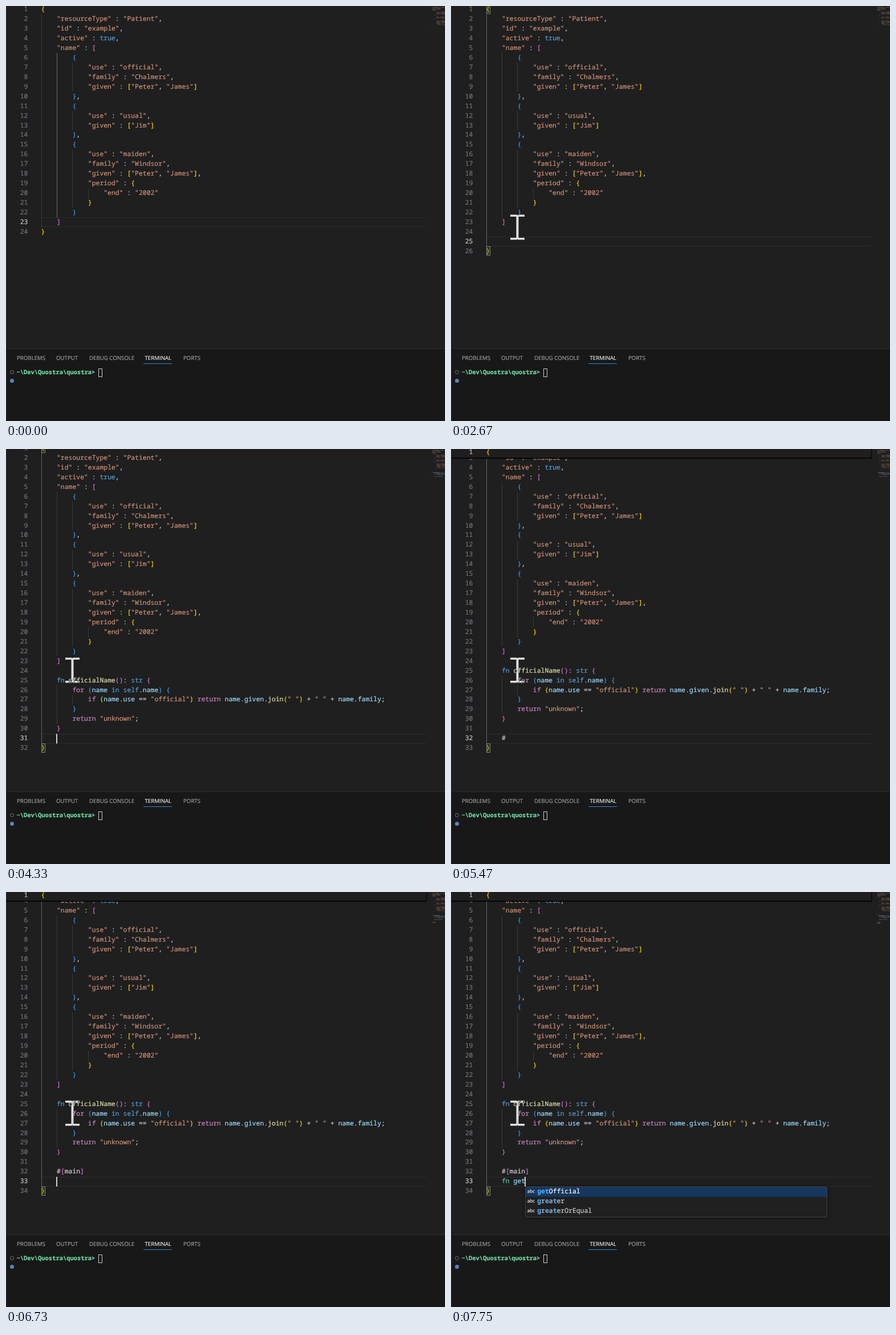
Write an HTML page with a canvas that moves like this. It is 770x727 px and loops after 8000 ms.

```html
<!DOCTYPE html>
<html lang="en">
<head>
<meta charset="utf-8">
<title>Code editor</title>
<style>
  html, body { margin: 0; width: 100%; height: 100%; overflow: hidden; background: #1f1f1f; }
  #stage { position: relative; width: 770px; height: 727px; overflow: hidden; background: #1f1f1f;
    color: #ccc; text-rendering: geometricPrecision; }
  #stage div, #stage canvas, #mouse { position: absolute; box-sizing: border-box; }
  #view, #sticky, #pop { font: 11.43px/16.94px "Noto Sans Mono", monospace; white-space: pre; }
  #view, #sticky, #pop, #panel { -webkit-text-stroke: .2px currentColor; }
  #view { inset: 0 0 127px 0; overflow: hidden; }
  .num, .code { margin-top: .5px; }
  .num { left: 0; width: 38.4px; text-align: right; color: #6e7681; }
  .on { color: #ccc; }
  .cur { left: 62px; width: 675px; height: 16.94px; border: solid #2d2d2d; border-width: 1px 0; }
  .guide { width: 1px; height: 17.2px; background: #3a3a3a; }
  .guide.live { background: #686868; }
  .match { width: 7px; height: 16px; border: 1px solid #888; background: #0064001a; }
  .caret { margin-left: -.9px; width: 1.4px; height: 16.94px; background: #d0d0d0; }
  #map { left: 744px; top: 0; }
  #sticky { left: 1px; top: 0; width: 736px; height: 14.5px; background: #1f1f1f; box-shadow: 0 1px 1px 1px #000c; }
  #sticky div { top: -2.3px; }
  #edge { left: 0; top: 0; width: 1px; height: 727px; background: #2b2b2b; }
  #panel { left: 0; top: 600px; width: 770px; height: 127px; background: #181818; border-top: 1px solid #2b2b2b; }
  .tab { top: 9px; font: 9.7px/14px "Open Sans", sans-serif; color: #9d9d9d; white-space: pre; }
  .tab.open { color: #e7e7e7; }
  #line { left: 241px; top: 25px; width: 50px; height: 1px; background: #2f86d6; }
  #prompt { left: 18.5px; top: 33px; font: bold 10.45px/16px "Noto Sans Mono", monospace; color: #6edba3; white-space: pre; }
  #prompt span { color: #8fd0d4; }
  #box { left: 162px; top: 34px; width: 7px; height: 15px; border: 1px solid #ccc; }
  #ring { left: 7px; top: 37px; width: 7px; height: 7px; border: 1px solid #777; border-radius: 50%; }
  #dot { left: 7px; top: 52px; width: 7px; height: 7px; background: #5b80c2; border-radius: 50%; }
  #pop { top: 515.7px; width: 530px; background: #202020; border: 1px solid #454545; border-radius: 3px;
    box-shadow: 0 0 6px #0008; overflow: hidden; }
  #pop div { left: 0; width: 100%; height: 16.94px; padding-left: 20px; }
  #pop div:first-child { background: #15375e; color: #fff; }
  #pop b { color: #4daafc; }
  #pop i { position: absolute; left: 2.5px; font: 600 8px/16px "Open Sans", sans-serif; letter-spacing: -.2px; color: #ccc; }
  #mouse { left: 0; top: 0; overflow: visible; mix-blend-mode: difference; }
</style>
</head>
<body>
<div id="stage">
  <div id="view"></div>
  <canvas id="map" width="26" height="70"></canvas>
  <div id="sticky"><div class="num on" style="left:-1px">1</div><div style="left:60.6px;color:#ffd700">{</div></div>
  <div id="panel">
    <div class="tab" style="left:19px">PROBLEMS</div>
    <div class="tab" style="left:88px">OUTPUT</div>
    <div class="tab" style="left:146px">DEBUG CONSOLE</div>
    <div class="tab open" style="left:243.5px">TERMINAL</div>
    <div class="tab" style="left:311px">PORTS</div>
    <div id="line"></div><div id="ring"></div><div id="dot"></div>
    <div id="prompt">~\Dev\Quostra\quostra<span>&gt;</span></div>
    <div id="box"></div>
  </div>
  <div id="edge"></div>
  <div id="pop"></div>
  <svg id="mouse" width="1" height="1">
    <path d="M-12.5-22H-1.5L0-21L1.5-22H12.5V-18.500H2V18.500H12.5V22H1.5L0 21L-1.5 22H-12.5V18.500H-2V-18.500H-12.5Z" fill="#fff"/>
  </svg>
</div>
<script>
const $ = id => document.getElementById(id);
const X0 = 61.6, CW = 6.86, LH = 16.94, TOP = -2.27, LOOP = 8000;

const head = `{
    "resourceType" : "Patient",
    "id" : "example",
    "active" : true,
    "name" : [
        {
            "use" : "official",
            "family" : "Chalmers",
            "given" : ["Peter", "James"]
        },
        {
            "use" : "usual",
            "given" : ["Jim"]
        },
        {
            "use" : "maiden",
            "family" : "Windsor",
            "given" : ["Peter", "James"],
            "period" : {
                "end" : "2002"
            }
        }`.split('\n');

const body = `    ]

    fn officialName(): str {
        for (name in self.name) {
            if (name.use == "official") return name.given.join(" ") + " " + name.family;
        }
        return "unknown";
    }

    #[main]`.split('\n');

// time, finished body lines, text on the current line, caret column (-1 = off), matched pair, suggestions
const steps = [
  [0, 0, ']', -1, ''],
  [1200, 0, ']', 5, 'list'],
  [1670, 0, ']', -1, 'list'],
  [2070, 1, '', 4, 'root'],
  [2200, 2, '', 4, 'root'],
  [2670, 2, '', -1, 'root'],
  [3200, 2, '', 4, 'root'],
  [3400, 7, '}', 5, 'fn'],
  [3870, 7, '}', -1, 'fn'],
  [4330, 8, '', 4, 'root'],
  [4400, 8, '', 4, 'root'],
  [4750, 9, '', 4, 'root'],
  [5010, 9, '#', 5, 'root'],
  [5470, 9, '#', -1, 'root'],
  [5610, 9, '#[]', 6, 'attr'],
  [5870, 9, '#[m]', 7, 'attr'],
  [6070, 9, '#[ma]', 8, 'attr'],
  [6140, 9, '#[ma]', 8, 'attr', 'main maiden match'],
  [6270, 9, '#[mai]', 9, 'attr', 'main maiden'],
  [6340, 9, '#[main]', 10, 'attr', 'main maiden'],
  [6540, 9, '#[main]', 11, 'attr'],
  [6730, 10, '', 4, 'root'],
  [6930, 10, 'f', 5, 'root'],
  [7000, 10, 'fn', 6, 'root', 'fn function family for from false official officialName self'],
  [7070, 10, 'fn ', 7, 'root'],
  [7530, 10, 'fn g', 8, 'root'],
  [7600, 10, 'fn g', 8, 'root', 'getOfficial given greater greaterOrEqual group global'],
  [7680, 10, 'fn ge', 9, 'root', 'getOfficial given greater greaterOrEqual'],
  [7750, 10, 'fn get', 10, 'root', 'getOfficial greater greaterOrEqual']
];

const pairColors = ['#ffd700', '#da70d6', '#3a9bf0'];

function wordColor(word, line, end) {
  if (/^(for|if|return)$/.test(word)) return '#c586c0';
  if (word === 'fn' && /fn\s*\w*$/.test(line)) return '#4ec9b0';
  if (/^(fn|in|self|str|true)$/.test(word)) return '#569cd6';
  if (line.includes('#')) return '#d4d4d4';
  return line[end] === '(' ? '#dcdcaa' : '#9cdcfe';
}

// Splits the document into coloured tokens, following bracket depth.
function tokenize(lines) {
  let depth = 0;
  return lines.map(line => [...line.matchAll(/"[^"]*"|\w+|\s+|./g)].map(m => {
    const text = m[0];
    let color = '#ccc';
    if (text[0] === '"') color = '#ce9178';
    else if (/\w/.test(text)) color = wordColor(text, line, m.index + text.length);
    else if (/[{[(]/.test(text)) color = pairColors[depth++ % 3];
    else if (/[}\])]/.test(text)) color = pairColors[--depth % 3];
    return { text, color, col: m.index };
  }));
}

function drawMap(rows) {
  const g = $('map').getContext('2d');
  g.clearRect(0, 0, 26, 70);
  rows.forEach((row, y) => row.forEach(tok => {
    g.fillStyle = tok.color;
    [...tok.text].forEach((ch, i) => {
      if (ch === ' ') return;
      g.globalAlpha = /\w/.test(ch) ? .48 : .28;
      g.fillRect((tok.col + i) * .89, y * 1.7, .8, 1.05);
    });
  }));
}

// Marks the letters of a suggestion that match the typed word in order.
function mark(item, word) {
  let i = 0;
  return [...item].map(ch => ch === word[i] ? (i++, `<b>${ch}</b>`) : ch).join('');
}

function render([time, done, typed, caret, pair, list]) {
  const lines = [...head, ...body.slice(0, done), '    ' + typed, '}'];
  const cur = 23 + done, last = lines.length;
  const scroll = Math.max(0, 378.9 + done * LH - 507.2);
  const top = n => TOP + (n - 1) * LH - scroll;
  const put = (cls, x, n, inner = '') =>
    `<div class="${cls}" style="${x === null ? '' : `left:${X0 + x * CW}px;`}top:${top(n)}px">${inner}</div>`;
  const rows = tokenize(lines);
  let html = put('cur', null, cur);

  lines.forEach((line, i) => {
    const n = i + 1, indent = line ? line.search(/\S|$/) : 4;
    for (let c = 0; c < indent; c += 4) {
      const live = done ? c === 0 : c === 4;
      html += put('guide' + (live ? ' live' : ''), c, n);
    }
    html += put('num' + (n === cur ? ' on' : ''), null, n, n);
    html += put('code', 0, n, rows[i].map(t => `<span style="color:${t.color}">${t.text}</span>`).join(''));
  });

  const pairs = {
    list: [[5, 13], [23, 4]],
    root: [[1, 0], [last, 0]],
    fn: [[25, 27], [30, 4]],
    attr: [[32, 5], [32, 3 + typed.length]]
  };
  (pairs[pair] || []).forEach(([n, c]) => html += put('match', c, n));
  if (caret >= 0) html += put('caret', caret, cur);
  $('view').innerHTML = html;
  $('sticky').style.display = time < 4400 ? 'none' : '';
  drawMap(rows);

  const pop = $('pop');
  pop.style.display = list ? '' : 'none';
  if (list) {
    const items = list.split(' '), word = typed.match(/(\w+)\]?$/)[1];
    pop.style.left = X0 + caret * CW + 'px';
    pop.style.height = items.length * LH + 3 + 'px';
    pop.innerHTML = items.map((it, i) =>
      `<div style="top:${i * LH + .5}px"><i>abc</i>${mark(it, word)}</div>`).join('');
  }
}

// Mouse path: progress, x, y
const path = [[0, 622, 671], [.5, 330, 520], [.85, 122, 381], [1, 116.5, 387.5]];

function moveMouse(t) {
  const mouse = $('mouse');
  mouse.style.display = t < 200 ? 'none' : '';
  const p = Math.min(1, Math.max(0, Math.floor((t - 200) / 66) / 10));
  const i = Math.max(1, path.findIndex(q => q[0] >= p));
  const [a, b] = [path[i - 1], path[i]], f = (p - a[0]) / (b[0] - a[0]);
  mouse.style.transform = `translate(${a[1] + (b[1] - a[1]) * f}px,${a[2] + (b[2] - a[2]) * f}px)`;
}

let shown = null;
const start = performance.now();
function tick() {
  const t = (performance.now() - start) % LOOP;
  const step = steps.findLast(s => s[0] <= t);
  if (step !== shown) render(shown = step);
  moveMouse(t);
  requestAnimationFrame(tick);
}
tick();
</script>
</body>
</html>
```
